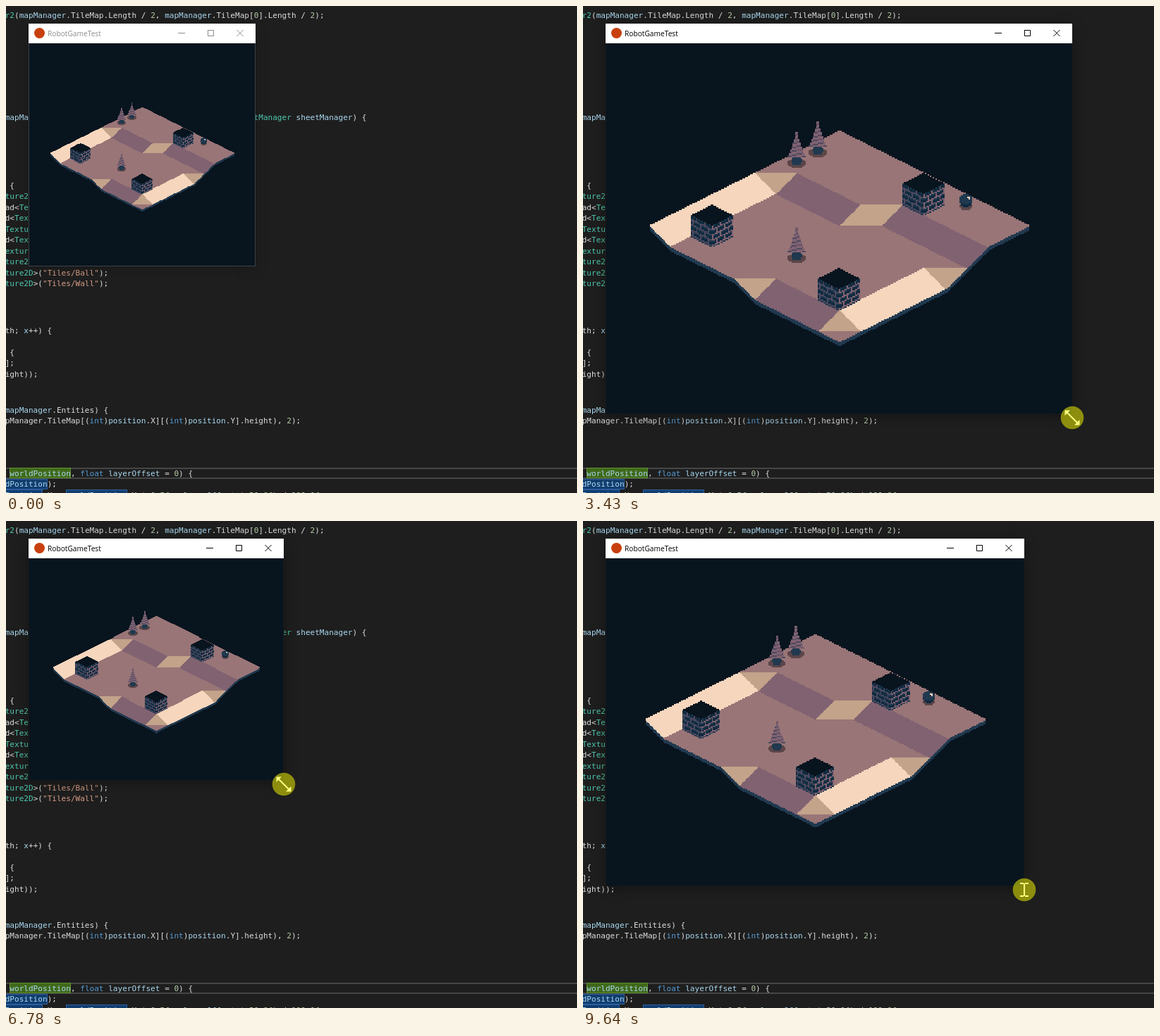
Write an HTML page with a canvas that moves like this. It is 810 px wide and 692 px high and loops after 9.68 s.

```html
<!DOCTYPE html>
<html lang="en">
<head>
<meta charset="utf-8">
<title>Window resize</title>
<style>
html, body { margin: 0; width: 100%; height: 100%; overflow: hidden; background: #1e1e1e; }
canvas { display: block; }
</style>
</head>
<body>
<canvas id="stage" width="810" height="692"></canvas>
<script>
const LOOP = 9680, LEFT = 33, TOP = 26, BAR = 53;
const C = {
  bg: '#08141e', navy: '#0f2a3f', blue: '#20394f', slate: '#4e495f', plum: '#816271',
  rose: '#997577', tan: '#c3a38a', cream: '#f6d6bd', shade: '#5b4548'
};

function layer(w, h) {
  const c = document.createElement('canvas');
  c.width = w;
  c.height = h;
  return [c, c.getContext('2d')];
}

// ---- editor behind the window: blocks of lines, each with its first row ----
const COL = 6.66, ROW = 15.45;
const BLOCKS = [
  [13, 'r2(mapManager.TileMap.Length / 2, mapManager.TileMap[0].Length / 2);'],
  [157.5, 'mapManager, ContentManager contentManager, SpriteSheetManager sheetManager) {'],
  [255, ' {',
    'ture2D>("Tiles/U0R0D0L0");',
    'ad<Texture2D>("Tiles/U1R1D0L0");',
    'd<Texture2D>("Tiles/U1R0D0L1");',
    'Texture2D>("Tiles/U0R0D0L0");',
    'd<Texture2D>("Tiles/U1R1D0L1");',
    'exture2D>("Tiles/U1R1D1L1");',
    'ture2D>("Tiles/Tree");',
    'ture2D>("Tiles/Ball");',
    'ture2D>("Tiles/Wall");'],
  [461, 'th; x++) {', '', ' {', '];', 'ight));'],
  [574, 'mapManager.Entities) {',
    'pManager.TileMap[(int)position.X][(int)position.Y].height), 2);'],
  [664, ' worldPosition, float layerOffset = 0) {',
    'dPosition);',
    'Position.X + worldPosition.Y * 0.5f + layerOffset * 50.0f) / 100.0f']
];
const INKS = [
  [/^"/, '#d69d85'],
  [/^(int|float)$/, '#569cd6'],
  [/(ture2D|^r2|^ContentManager|^SpriteSheetManager)$/, '#4ec9b0'],
  [/^(mapManager|sheetManager|position|\w*Position|layerOffset|x)$/, '#a9d8f0'],
  [/^\d/, '#b5cea8']
];

function drawEditor() {
  const [c, g] = layer(810, 692);
  g.fillStyle = '#1e1e1e';
  g.fillRect(0, 0, 810, 692);
  g.fillStyle = '#464646';
  g.fillRect(0, 656, 810, 2);
  g.fillRect(0, 670, 810, 2);
  const mark = (x, y, w, fill, edge) => {
    g.fillStyle = fill;
    g.fillRect(x, y, w, 15);
    g.strokeStyle = edge;
    g.strokeRect(x + .5, y + .5, w - 1, 14);
  };
  mark(5, 656, 87, '#40691a', '#5f8f2c');
  mark(-2, 672, 61, '#113d6f', '#2c5f9e');
  mark(-2, 687, 54, '#113d6f', '#2c5f9e');
  mark(85, 687, 87, '#113d6f', '#2c5f9e');
  g.font = '11.06px "DejaVu Sans Mono", monospace';
  for (const [top, ...lines] of BLOCKS)
    lines.forEach((text, i) => {
      for (const m of text.matchAll(/"[^"]*"|\w+|[^\w"]+/g)) {
        const ink = INKS.find(([re]) => re.test(m[0]));
        g.fillStyle = ink ? ink[1] : '#dcdcdc';
        g.fillText(m[0], -1.3 + m.index * COL, Math.round(top + i * ROW + 4));
      }
    });
  return c;
}

// ---- isometric map, drawn once in game pixels ----
const OX = 152, OY = 92, TILES = 9;

// how many steps the ground has dropped at a grid corner
function drop(u, v) {
  const ledge = (u >= 1 && v >= 4) || (u >= 5 && v >= 3);
  const rim = (u >= 9 && v >= 4) || (u >= 5 && v >= 9);
  return ledge + rim;
}

const corner = (u, v) => [16 * (u - v), 8 * (u + v + drop(u, v)) - 74];

function drawMap() {
  const [c, g] = layer(304, 190);
  const run = (x, y, w, color) => {
    g.fillStyle = color;
    g.fillRect(x + OX, y + OY, w, 1);
  };
  // scanline fill keeps the stair-step edges
  const poly = (color, pts, grow = 0, dy = 0) => {
    const ys = pts.map(p => p[1]);
    for (let y = Math.min(...ys); y < Math.max(...ys); y++) {
      const s = y + .5, xs = [];
      pts.forEach(([ax, ay], i) => {
        const [bx, by] = pts[(i + 1) % pts.length];
        if ((ay <= s) !== (by <= s)) xs.push(ax + (s - ay) / (by - ay) * (bx - ax));
      });
      const a = Math.round(Math.min(...xs)), b = Math.round(Math.max(...xs));
      run(a, y + dy, b - a + grow, color);
    }
  };
  const oval = (cx, cy, rx, ry, color) => {
    for (let y = Math.floor(cy - ry); y < cy + ry; y++) {
      const h = Math.round(rx * Math.sqrt(Math.max(0, 1 - ((y + .5 - cy) / ry) ** 2)));
      run(cx - h, y, 2 * h, color);
    }
  };
  const eachTile = fn => {
    for (let u = 0; u < TILES; u++)
      for (let v = 0; v < TILES; v++)
        fn([[u, v], [u + 1, v], [u, v + 1], [u + 1, v + 1]]);
  };
  const ground = grow => eachTile(grid => {
    const [a, b, l, e] = grid.map(p => drop(...p));
    const [pa, pb, pl, pe] = grid.map(p => corner(...p));
    const slope = b > a && e > l && a === l ? C.cream : l > a && e > b && a === b ? C.plum : null;
    poly(slope || (a !== b || a !== l ? C.tan : C.rose), [pa, pb, pl], grow);
    poly(slope || (e !== b || e !== l ? C.tan : C.rose), [pb, pe, pl], grow);
  });

  eachTile(grid => {
    const [a, b, l, e] = grid.map(p => corner(...p));
    for (let dy = 1; dy <= 3; dy++) poly(C.blue, [a, b, e, l], 1, dy);
  });
  ground(1);
  ground(0);

  const wall = (x0, y0) => {
    const top = y0 - 24;
    for (let x = -16; x < 16; x++) {
      const edge = top + 15 - Math.floor(Math.abs(x + .5) / 2);
      for (let k = 0; k <= 16; k++) {
        const row = k >> 2, seam = k % 4 === 3, joint = (x + 18 + row % 2 * 3) % 6 === 0;
        const mortar = x < 0 ? C.slate : C.plum;
        run(x0 + x, edge + k, 1, seam || joint ? mortar : k % 4 ? C.navy : C.blue);
      }
    }
    poly(C.bg, [[x0, top], [x0 + 16, top + 8], [x0, top + 16], [x0 - 16, top + 8]]);
  };
  const tree = (x0, y0) => {
    oval(x0, y0 + .5, 7, 3.5, C.shade);
    oval(x0, y0 - 1.5, 4, 4, C.blue);
    for (let i = 0; i < 19; i++) {
      const h = Math.round(.6 + 6 * (i / 18) ** 1.3);
      for (let x = -h; x < h; x++)
        run(x0 + x, y0 - 23 + i, 1, (i + Math.floor((x + 8) / 4)) % 3 ? C.plum : C.slate);
    }
  };
  const ball = (x0, y0) => {
    oval(x0, y0 + 1, 5, 3, C.shade);
    oval(x0, y0 - 3, 5, 5, C.navy);
    oval(x0, y0 - 4, 5, 4, C.blue);
    run(x0 + 1, y0 - 6, 2, C.cream);
    run(x0 + 2, y0 - 5, 1, C.cream);
  };
  const place = (draw, u, v) => {
    const [x, y] = corner(u, v);
    draw(x, y + 8);
  };
  place(tree, 0, 1);
  place(tree, 0, 2);
  place(wall, 5, 1);
  place(ball, 6, 0);
  place(wall, 1, 7);
  place(tree, 4, 6);
  place(wall, 7, 7);
  return c;
}

// ---- motion: each drag pulls the lower right corner to a new place ----
const smooth = f => f * f * (3 - 2 * f);
const DRAGS = [
  { t0: 1570, t1: 2045, to: [634, 387] },
  { t0: 2710, t1: 3200, to: [693, 579] },
  { t0: 3430, t1: 4585, to: [829, 623], easeX: f => f ** 5.5, easeY: f => f, sag: 79 },
  { t0: 6250, t1: 6760, to: [393, 368] },
  { t0: 7730, t1: 8205, to: [505, 205], lag: 475 },
  { t0: 8820, t1: 9360, to: [625, 518] }
];
const PRESSED = [[1570, 2065], [2560, 7125], [7430, 9375], [9640, LOOP]];

function gripAt(t) {
  let x = 353, y = 369;
  for (const { t0, t1, to, easeX = smooth, easeY = smooth, sag = 0 } of DRAGS) {
    if (t < t0) break;
    const f = Math.min(1, (t - t0) / (t1 - t0));
    x += (to[0] - x) * easeX(f);
    y += (to[1] - y) * easeY(f) + sag * Math.sin(Math.PI * f);
  }
  return [Math.round(x), Math.round(y)];
}

// the game redraws a little after the window frame
function gameAt(t) {
  const drag = DRAGS.find(d => t >= d.t0 && t < d.t1);
  return gripAt(drag ? Math.max(drag.t0, t - (drag.lag || 25)) : t);
}

function cursorAt(t, [r, b]) {
  if (t >= DRAGS[0].t0) return [r + 1, b + 6];
  const f = Math.min(1, (t - 60) / 950);
  return [676 - 323 * f, 704 - 326 * f - 305 * Math.sin(Math.PI * f)];
}

const ctx = document.getElementById('stage').getContext('2d');
const editor = drawEditor(), map = drawMap();

function path(color, width, ...lines) {
  ctx.strokeStyle = color;
  ctx.lineWidth = width;
  ctx.beginPath();
  for (const [x, y, ...rest] of lines) {
    ctx.moveTo(x, y);
    for (let i = 0; i < rest.length; i += 2) ctx.lineTo(rest[i], rest[i + 1]);
  }
  ctx.stroke();
}

function drawTitle(r, active) {
  ctx.fillStyle = '#fff';
  ctx.fillRect(LEFT - 1, TOP - 1, r - LEFT + 2, BAR - TOP + 1);
  ctx.fillStyle = '#c8400f';
  ctx.beginPath();
  ctx.arc(47.5, 38.5, 7.5, 0, 7);
  ctx.fill();
  const ink = active ? '#000' : '#8c8c8c';
  ctx.fillStyle = ink;
  ctx.font = '10.2px "Open Sans", sans-serif';
  ctx.fillText('RobotGameTest', 59, 43);
  const x = r - 21, m = r - 66.5, n = r - 109;
  path(ink, 1, [n, 38.5, n + 10, 38.5], [m, 34.5, m + 8, 34.5, m + 8, 42.5, m, 42.5, m, 34],
    [x - 4.5, 34, x + 4.5, 43], [x + 4.5, 34, x - 4.5, 43]);
}

function drawWindow(t, [r, b]) {
  const active = t >= DRAGS[0].t0;
  ctx.save();
  ctx.shadowColor = active ? 'rgba(0,0,0,.4)' : 'rgba(0,0,0,.2)';
  ctx.shadowBlur = 18;
  ctx.shadowOffsetY = 3;
  ctx.fillStyle = '#000';
  ctx.fillRect(LEFT, TOP, r - LEFT, b - TOP);
  ctx.restore();
  ctx.strokeStyle = active ? '#15191c' : '#3a4045';
  ctx.lineWidth = 1;
  ctx.strokeRect(LEFT - .5, TOP - .5, r - LEFT + 1, b - TOP + 1);

  const [gr, gb] = gameAt(t);
  const w = gr - LEFT, h = gb - BAR, p = w / 352;
  ctx.save();
  ctx.beginPath();
  ctx.rect(LEFT, BAR, r - LEFT, b - BAR);
  ctx.clip();
  ctx.fillStyle = C.bg;
  ctx.fillRect(LEFT, BAR, w, h);
  ctx.imageSmoothingEnabled = false;
  ctx.drawImage(map, LEFT + w / 2 - OX * p, BAR + h / 2 - OY * p, map.width * p, map.height * p);
  ctx.restore();
  drawTitle(r, active);
}

function drawBeam() {
  const ends = y => [[-6, y, -1, y], [1, y, 6, y]];
  path('#fff', 2, [0, -9, 0, 9], ...ends(-9), ...ends(9));
}

function drawArrows() {
  path('#fff', 2, [-9, -9, 9, 9]);
  ctx.fillStyle = '#fff';
  for (const s of [-1, 1]) {
    ctx.beginPath();
    ctx.moveTo(10.5 * s, 10.5 * s);
    ctx.lineTo(10.5 * s, 3 * s);
    ctx.lineTo(3 * s, 10.5 * s);
    ctx.fill();
  }
}

function drawCursor(t, grip) {
  if (t < 60) return;
  ctx.save();
  ctx.translate(...cursorAt(t, grip));
  if (t < 1300 || t >= 9640) drawBeam();
  else drawArrows();
  if (PRESSED.some(([a, b]) => t >= a && t < b)) {
    ctx.fillStyle = 'rgba(255,255,0,.5)';
    ctx.beginPath();
    ctx.arc(0, 0, 16.3, 0, 7);
    ctx.fill();
  }
  ctx.restore();
}

let start;
function frame(now) {
  start ??= now;
  const t = (now - start) % LOOP, grip = gripAt(t);
  ctx.drawImage(editor, 0, 0);
  drawWindow(t, grip);
  drawCursor(t, grip);
  requestAnimationFrame(frame);
}
requestAnimationFrame(frame);
</script>
</body>
</html>
```
